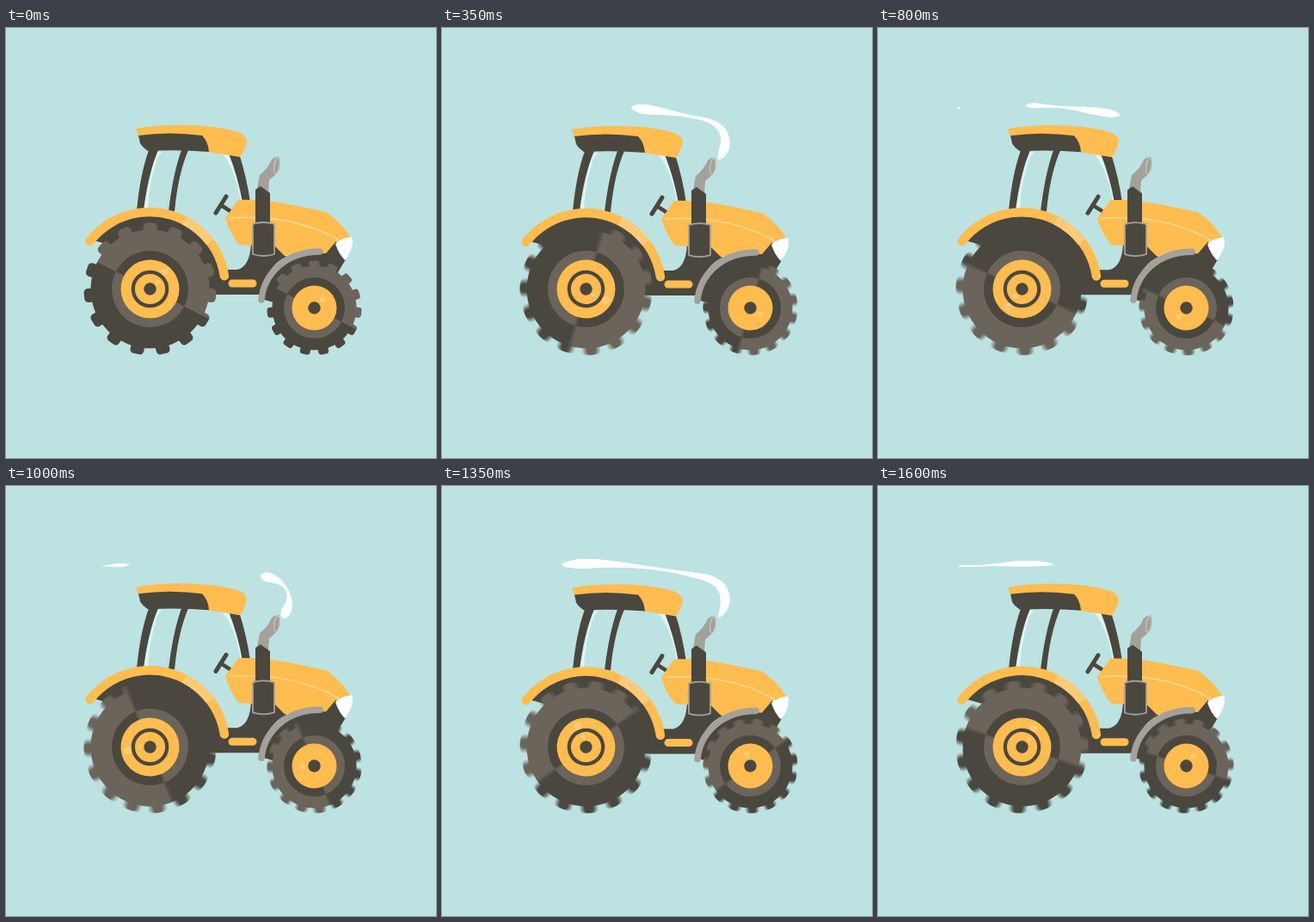
Animation, 500 px wide and 500 px high, one loop 1650 ms. Source, as an HTML page with a canvas:

```html
<!DOCTYPE html>
<html lang="en">
<head>
<meta charset="utf-8">
<title>Tractor</title>
<style>
html, body { margin: 0; width: 100%; height: 100%; overflow: hidden; background: #bce3e1; }
canvas { display: block; }
</style>
</head>
<body>
<canvas id="stage" width="500" height="500"></canvas>
<script>
const LOOP = 1650, STEP = 50, TAU = Math.PI * 2, DEG = Math.PI / 180;
const SKY = '#bce3e1', YELLOW = '#ffbc4f', PALE = '#ffca75', DARK = '#4a473f',
  LIGHT = '#6b645a', MID = '#5b564d', GREY = '#a4a09a', GLASS = '#ddf6f4';

const ctx = document.getElementById('stage').getContext('2d');
const layer = document.createElement('canvas');
layer.width = layer.height = 500;
const treadCtx = layer.getContext('2d');
ctx.lineCap = 'round';
ctx.lineJoin = 'round';

function fill(color, d) {
  ctx.fillStyle = color;
  ctx.fill(new Path2D(d));
}
function line(color, width, d) {
  ctx.strokeStyle = color;
  ctx.lineWidth = width;
  ctx.stroke(new Path2D(d));
}
function disc(color, x, y, r) {
  ctx.fillStyle = color;
  ctx.beginPath();
  ctx.arc(x, y, r, 0, TAU);
  ctx.fill();
}
function arc(color, width, x, y, r, from = 0, to = 360) {
  ctx.strokeStyle = color;
  ctx.lineWidth = width;
  ctx.beginPath();
  ctx.arc(x, y, r, from * DEG, to * DEG);
  ctx.stroke();
}

function cab() {
  fill(GLASS, 'M174 144H182Q176 148 174 158Q166 184 165 210H160Z');
  fill(GLASS, 'M251 146H262L276 201H273Q266 163 251 146Z');
  fill(DARK, 'M166 142H177Q165 170 160 212H152Q156 170 166 142Z');
  fill(DARK, 'M204 142H212Q200 170 196 213H189Q194 170 204 142Z');
  fill(DARK, 'M259 146H271Q280 174 284 203H275Q270 174 259 146Z');
  fill(YELLOW, 'M151 117C190 110 240 112 270 121Q279 125 280 131Q278 142 272 150L235 144L200 132L154 126Z');
  fill(DARK, 'M154 125Q190 120 228 125Q235 132 236 144Q200 141 165 143Q158 138 156 134Z');
  line(DARK, 5, 'M244 215L256 196');
  line(DARK, 4.5, 'M250 206L264 215');
}

function chassis() {
  fill(DARK, 'M285 250Q284 277 269 281H225V310H296L300 300Q306 275 326 266L312 251Z');
  fill(DARK, 'M297 315Q306 264 366 260L372 262L383 247L395 269L386 284L392 300L358 326L314 320Z');
  line(YELLOW, 9, 'M263 297H287');
  ctx.fillStyle = DARK;
  ctx.beginPath();
  ctx.arc(167, 302, 86, 220 * DEG, 351 * DEG);
  ctx.fill();
}

function hood() {
  fill(YELLOW, 'M270 200C302 198 340 207 372 214Q390 226 400 243L384 248L372 262H340L324 265L313 254L271 252Q260 238 255 221Z');
  line('#ffdd9c', 1.4, 'M259 221Q333 216 386 246');
  fill('#fff', 'M383 251Q390 244 402 243Q406 254 394 270Q387 263 383 251Z');
  fill(GREY, 'M292 187L295 171Q305 163 309 153Q313 149 318 150Q320 160 315 169L306 177L305 193Z');
  ctx.strokeStyle = '#cbc7c0';
  ctx.lineWidth = 1.2;
  ctx.beginPath();
  ctx.ellipse(315, 160, 3.2, 9.5, 8 * DEG, 0, TAU);
  ctx.stroke();
  fill(DARK, 'M290 188L296 184L307 192V230H290Z');
  const box = 'M287 228Q299 224 312 228V263Q299 267 287 263Z';
  fill(DARK, box);
  line(GREY, 1.8, box);
}

function fenders() {
  arc(YELLOW, 10.5, 167, 302, 88, 218, 351);
  ctx.lineCap = 'butt';
  arc(PALE, 10.5, 167, 302, 88, -63, -37);
  ctx.lineCap = 'round';
  line(GREY, 7.5, 'M297 316C300 286 325 260 365 260');
}

// Rounded lugs standing around a tyre
function treadPath(root, tip, width, count = 15) {
  const path = new Path2D(), lug = new Path2D();
  lug.roundRect(-width / 2, -tip, width, tip - root + 6, width * 0.28);
  for (let i = 0; i < count; i++) {
    path.addPath(lug, new DOMMatrix().rotate(i * 360 / count));
  }
  return path;
}

const wheels = [
  { x: 167.5, y: 303.5, tyre: 69, ring: 44.5, rim: 34, groove: 19.7,
    shine: [[17, -20, 4.5], [9, -8, 2.8]], tread: treadPath(68, 77, 16) },
  { x: 358.5, y: 325.5, tyre: 49, ring: 35.5, rim: 26,
    shine: [[9.5, -10, 3.3]], tread: treadPath(48, 55, 12) }
];

// Two-tone fill, with its edges softened by the turning
function halves(c, first, second, blur) {
  const g = c.createConicGradient(27 * DEG, 0, 0), soft = Math.max(blur / 720, 0.001);
  g.addColorStop(0, MID);
  g.addColorStop(soft, first);
  g.addColorStop(0.5 - soft, first);
  g.addColorStop(0.5 + soft, second);
  g.addColorStop(1 - soft, second);
  g.addColorStop(1, MID);
  return g;
}

function treads(angle, blur) {
  const samples = blur ? 8 : 1, c = treadCtx;
  c.clearRect(0, 0, 500, 500);
  c.globalCompositeOperation = 'lighter';
  c.globalAlpha = 1 / samples;
  for (const w of wheels) {
    for (let i = 0; i < samples; i++) {
      c.save();
      c.translate(w.x, w.y);
      c.rotate((angle + blur * ((i + 0.5) / samples - 0.5)) * DEG);
      c.fillStyle = halves(c, DARK, LIGHT, 0);
      c.fill(w.tread);
      c.restore();
    }
  }
  ctx.drawImage(layer, 0, 0);
}

function wheel(w, angle, blur) {
  ctx.save();
  ctx.translate(w.x, w.y);
  ctx.rotate(angle * DEG);
  disc(halves(ctx, DARK, LIGHT, blur), 0, 0, w.tyre);
  disc(halves(ctx, LIGHT, DARK, blur), 0, 0, w.ring);
  disc(YELLOW, 0, 0, w.rim);
  if (w.groove) arc(DARK, 4.2, 0, 0, w.groove);
  for (const [x, y, r] of w.shine) disc(PALE, x, y, r);
  disc(DARK, 0, 0, 7.2);
  ctx.restore();
}

const trail = document.createElementNS('http://www.w3.org/2000/svg', 'path');
trail.setAttribute('d', 'M322 152C334 136 334 111 300 105C265 98 240 94 200 91S130 94 92 93');
const trailLength = trail.getTotalLength();

// Distance along the trail, slowing down towards its end
function drift(age, duration) {
  const u = Math.min(1, Math.max(0, age / duration));
  return trailLength * Math.sin(u * Math.PI / 2);
}

// A ribbon of smoke with a thin waist, which shrinks once it leaves the pipe
function puff(time, born, released) {
  const head = drift(time - born, 760), tail = drift(time - released, 500);
  const gone = tail / trailLength, size = 6 * (1 - 0.8 * gone);
  for (let s = tail; s < head; s += 0.6) {
    const u = (s - tail) / (head - tail), p = trail.getPointAtLength(s);
    const swell = 0.25 + 0.75 * Math.cos(Math.PI * (u - gone / 2)) ** 2;
    const taper = Math.min(1, Math.sqrt(10 * Math.min(u, 1 - u)));
    disc('#fff', p.x, p.y, size * swell * taper);
  }
}

function draw(now) {
  const time = Math.floor(now % LOOP / STEP) * STEP, turn = time / LOOP;
  const blur = time ? 180 * STEP / LOOP : 0, angle = 360 * turn + blur / 2;
  const shake = 0.8 * (1 - Math.cos(8 * TAU * turn));
  const body = (...parts) => {
    ctx.save();
    ctx.translate(0, shake);
    parts.forEach(part => part());
    ctx.restore();
  };
  ctx.fillStyle = SKY;
  ctx.fillRect(0, 0, 500, 500);
  puff(time, 80, 350);
  puff(time, 420, 700);
  puff(time, 880, 1400);
  body(cab, chassis, hood);
  treads(angle, blur);
  wheels.forEach(w => wheel(w, angle, blur));
  body(fenders);
}

let start;
function tick(now) {
  start ??= now;
  draw(now - start);
  requestAnimationFrame(tick);
}
requestAnimationFrame(tick);
</script>
</body>
</html>
```
